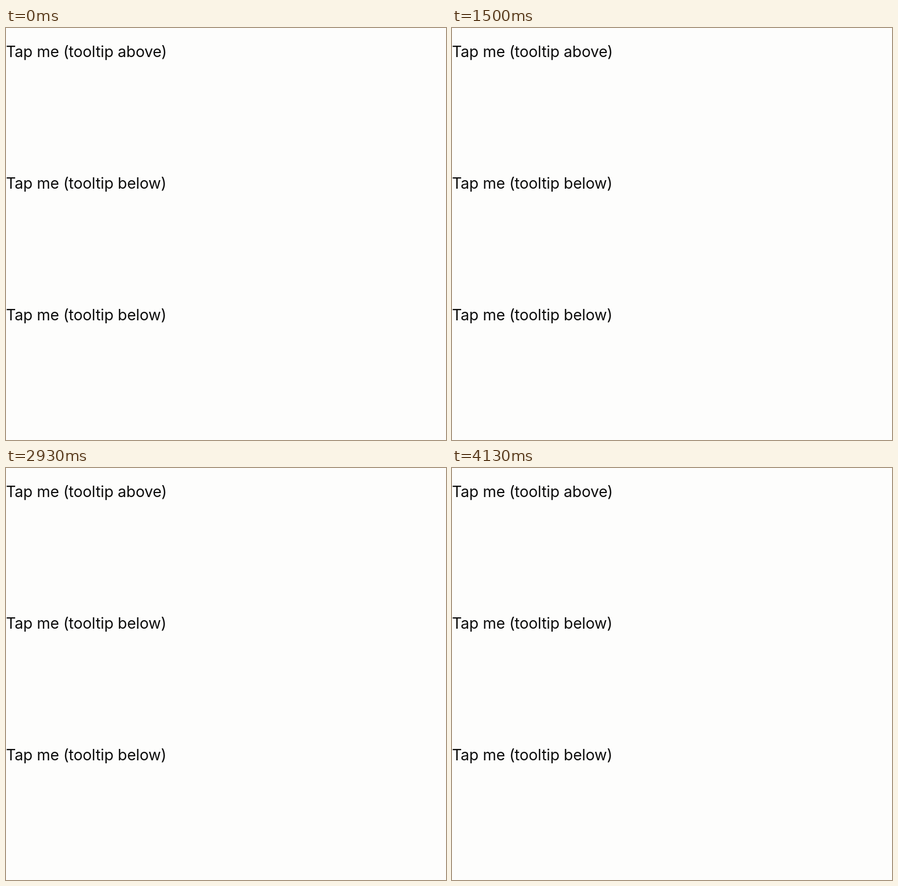
Recreate the animation shown at these times as an HTML page. Size 774x723 px, loop 4200 ms.

```html
<!DOCTYPE html>
<html lang="en">
<head>
<meta charset="utf-8">
<title>Tooltips</title>
<style>
  html, body { margin: 0; width: 100%; height: 100%; overflow: hidden; background: #fdfdfc; }
  svg { display: block; width: 774px; height: 723px; }
  text {
    font: 400 27px Inter, "Liberation Sans", sans-serif;
    font-optical-sizing: none;
    letter-spacing: -0.15px;
    fill: #0b0b0b;
  }
  .tip { visibility: hidden; animation: 4200ms step-end infinite; }
  .tip rect { fill: #1f1f20; }
  .tip text { fill: #f7f7f7; }
  .first { animation-name: first; }
  .second { animation-name: second; }
  .third { animation-name: third; }
  @keyframes first {
    0%, 35.714% { visibility: hidden; }
    27.857% { visibility: visible; }
  }
  @keyframes second {
    0%, 69.047% { visibility: hidden; }
    57.857% { visibility: visible; }
  }
  @keyframes third {
    0%, 98.333% { visibility: hidden; }
    88.095% { visibility: visible; }
  }
</style>
</head>
<body>
<svg viewBox="0 0 774 723">
  <text x="0" y="51">Tap me (tooltip above)</text>
  <text x="0" y="282">Tap me (tooltip below)</text>
  <text x="0" y="512.5">Tap me (tooltip below)</text>

  <g class="tip first">
    <rect y="58" width="541.5" height="82.5" rx="8"/>
    <text x="8" y="92.5">This tooltip does not fit above the button.</text>
    <text x="8" y="126">This is why it's displayed below instead!</text>
  </g>
  <g class="tip second">
    <rect y="206" width="428.5" height="49" rx="8"/>
    <text x="8" y="240.5">This tooltip fits above the button</text>
  </g>
  <g class="tip third">
    <rect y="436.5" width="428.5" height="49" rx="8"/>
    <text x="8" y="471">This tooltip fits above the button</text>
  </g>
</svg>
</body>
</html>
```
